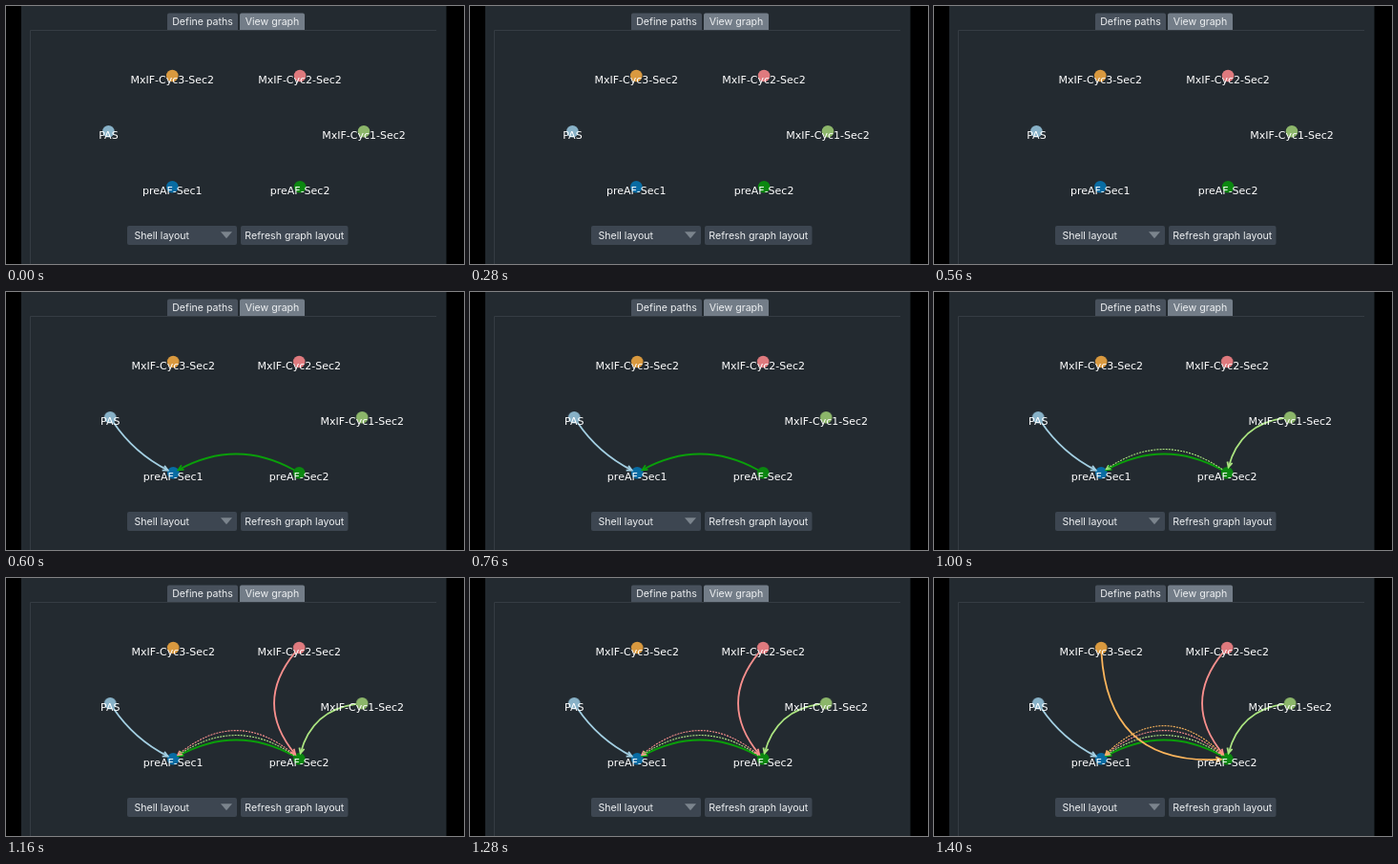
Animation, 480 px wide and 270 px high, one loop 1480 ms. Source, as an HTML page:

```html
<!DOCTYPE html>
<html lang="en">
<head>
<meta charset="utf-8">
<title>Graph view</title>
<style>
  html, body { margin: 0; width: 100%; height: 100%; overflow: hidden; background: #000; }
  svg { display: block; width: 480px; height: 270px; }
  .ui { font: 10.6px Inter, Roboto, sans-serif; fill: #eef0f2; text-anchor: middle; }
  .label { font: 11px "DejaVu Sans", sans-serif; fill: #fff; text-anchor: middle; }
  .edge { fill: none; stroke-width: 1.8; stroke-linejoin: miter; }
  .edge.dotted { stroke-width: 1.1; }
  .dotted .line { stroke-dasharray: 2 1.1; }
  .node, .step { animation: 1480ms step-end infinite; }
  .node { animation-name: settle; }
  .step { visibility: hidden; }
  .s0 { animation-name: show0; }
  .s1 { animation-name: show1; }
  .s2 { animation-name: show2; }
  .s3 { animation-name: show3; }
  /* 600, 840, 1160 and 1400 ms of 1480 */
  @keyframes settle { 0% { transform: none; } 40.5405%, 100% { transform: translateX(var(--dx)); } }
  @keyframes show0 { 0% { visibility: hidden; } 40.5405%, 100% { visibility: visible; } }
  @keyframes show1 { 0% { visibility: hidden; } 56.7567%, 100% { visibility: visible; } }
  @keyframes show2 { 0% { visibility: hidden; } 78.3783%, 100% { visibility: visible; } }
  @keyframes show3 { 0% { visibility: hidden; } 94.5945%, 100% { visibility: visible; } }
</style>
</head>
<body>
<svg viewBox="0 0 480 270">
  <rect width="480" height="270" fill="#000"/>
  <rect x="16" width="445.5" height="270" fill="#232a30"/>
  <path d="M451 25.5H25.5V270" fill="none" stroke="#353c43"/>
  <path d="M169 25V9.5q0-2 2-2H241q2 0 2 2V25z" fill="#48515c"/>
  <path d="M245 25V9.5q0-2 2-2H311q2 0 2 2V25z" fill="#737d88"/>
  <rect x="127" y="230" width="115" height="20" rx="2" fill="#3d4651"/>
  <rect x="246" y="230" width="112.5" height="20" rx="2" fill="#3d4651"/>
  <path d="M225 236.3H237L231 243.3z" fill="#7b848d"/>
  <g class="ui">
    <text x="206" y="20.4">Define paths</text>
    <text x="279" y="20.4">View graph</text>
    <text x="163.3" y="244">Shell layout</text>
    <text x="302.3" y="244">Refresh graph layout</text>
  </g>
  <g id="dots"></g>
  <g id="edges"></g>
  <g id="labels"></g>
</svg>
<script>
  const CX = 241.2, WIDE = 66.9, TIGHT = 66, GAP = 6;

  // name: [column, y, colour]
  const nodes = {
    'MxIF-Cyc3-Sec2': [-1, 73, '#d9993f'],
    'MxIF-Cyc2-Sec2': [1, 73, '#df7a7e'],
    'MxIF-Cyc1-Sec2': [2, 131.3, '#8cb66a'],
    'PAS': [-2, 131.3, '#87b1c7'],
    'preAF-Sec1': [-1, 189.3, '#086ca3'],
    'preAF-Sec2': [1, 189.3, '#0b8710']
  };

  // step, from, to, bend, colour, dotted
  const edges = [
    [0, 'PAS', 'preAF-Sec1', 0.15, '#a3cfe2'],
    [0, 'preAF-Sec2', 'preAF-Sec1', 0.3, '#0a9f0a'],
    [1, 'MxIF-Cyc1-Sec2', 'preAF-Sec2', 0.375, '#abe480'],
    [1, 'preAF-Sec2', 'preAF-Sec1', 0.375, '#abe480', true],
    [2, 'MxIF-Cyc2-Sec2', 'preAF-Sec2', 0.45, '#f88f8d'],
    [2, 'preAF-Sec2', 'preAF-Sec1', 0.45, '#f88f8d', true],
    [3, 'MxIF-Cyc3-Sec2', 'preAF-Sec2', 0.525, '#fcb55c'],
    [3, 'preAF-Sec2', 'preAF-Sec1', 0.525, '#fcb55c', true]
  ];

  function add(parent, tag, attrs, text) {
    const el = document.createElementNS('http://www.w3.org/2000/svg', tag);
    for (const key in attrs) el.setAttribute(key, attrs[key]);
    if (text) el.textContent = text;
    return parent.appendChild(el);
  }

  const byId = id => document.getElementById(id);
  const mix = (p, q, t) => [p[0] + (q[0] - p[0]) * t, p[1] + (q[1] - p[1]) * t];
  const dist = (p, q) => Math.hypot(p[0] - q[0], p[1] - q[1]);
  const place = name => [CX + nodes[name][0] * TIGHT, nodes[name][1]];
  const fmt = p => p.map(v => v.toFixed(2)).join(' ');

  // Drop the part of a quadratic curve lying within GAP of its start.
  function trim([a, c, b]) {
    let t = 0, p = a;
    while (dist(p, a) < GAP) {
      t += 0.002;
      p = mix(mix(a, c, t), mix(c, b, t), t);
    }
    return [p, mix(c, b, t), b];
  }

  function arc(from, to, bend) {
    const a = place(from), b = place(to), m = mix(a, b, 0.5);
    const c = [m[0] - bend * (b[1] - a[1]), m[1] + bend * (b[0] - a[0])];
    return trim(trim([a, c, b]).reverse()).reverse();
  }

  function head(c, tip, size) {
    const angle = Math.atan2(c[1] - tip[1], c[0] - tip[0]);
    const wing = turn => fmt([
      tip[0] + size * Math.cos(angle + turn),
      tip[1] + size * Math.sin(angle + turn)
    ]);
    return `M${wing(0.46)}L${fmt(tip)}L${wing(-0.46)}`;
  }

  for (const [name, [col, y, fill]] of Object.entries(nodes)) {
    const x = CX + col * WIDE;
    const style = `--dx:${(col * (TIGHT - WIDE)).toFixed(2)}px`;
    add(byId('dots'), 'circle', { class: 'node', cx: x, cy: y, r: 6.3, fill, style });
    add(byId('labels'), 'text', { class: 'node label', x, y: y + 8.1, style }, name);
  }

  for (const [step, from, to, bend, stroke, dotted] of edges) {
    const [a, c, b] = arc(from, to, bend);
    const g = add(byId('edges'), 'g', {
      class: `edge step s${step}${dotted ? ' dotted' : ''}`, stroke
    });
    add(g, 'path', { class: 'line', d: `M${fmt(a)}Q${fmt(c)} ${fmt(b)}` });
    add(g, 'path', { d: head(c, b, dotted ? 5 : 6) });
  }
</script>
</body>
</html>
```
